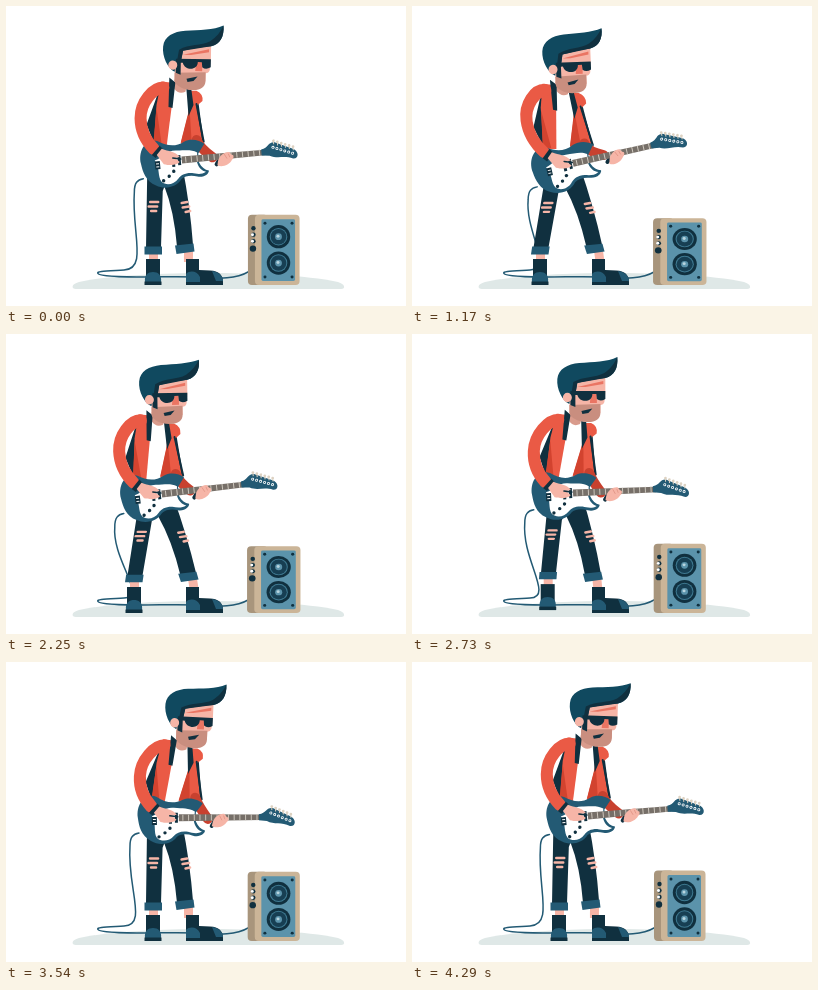
These frames come from a looping animation (400 by 300 pixels, 4.32 s). An HTML page:

```html
<!DOCTYPE html>
<html lang="en">
<head>
<meta charset="utf-8">
<title>Guitarist</title>
<style>
html, body { margin: 0; width: 100%; height: 100%; overflow: hidden; background: #fff; }
svg { display: block; width: 100vw; height: 100vh; }
.navy { fill: #10303f; }
.teal { fill: #10495f; }
.blue { fill: #235a74; }
.red { fill: #ea5a45; }
.shade { fill: #d2432f; }
.skin { fill: #f6b5a7; }
.white { fill: #fff; }
.line { fill: none; stroke-linecap: round; stroke-linejoin: round; }
</style>
</head>
<body>
<svg viewBox="0 0 400 300">
  <path fill="#dfe8e7" d="M70 283H335C340 283 339 278 332 276C300 269 245 267 202 267S105 269 73 276C65 278 65 283 70 283Z"/>
  <path id="cable" class="line" stroke="#235a74" stroke-width="1.5"/>

  <g id="amp">
    <rect x="242" y="208.500" width="20" height="70.500" rx="4" fill="#a8957c"/>
    <rect x="249" y="208.500" width="44.500" height="70.500" rx="4" fill="#cbb598"/>
    <rect x="255.500" y="213" width="33.500" height="62" rx="1.500" fill="#5b93ab"/>
    <g id="speakers"></g>
    <g class="navy">
      <circle cx="247.500" cy="222" r="2.200"/><circle cx="247.500" cy="228.500" r="2.200"/>
      <circle cx="247.500" cy="235" r="2.200"/><circle cx="247" cy="242.500" r="3.200"/>
    </g>
    <g class="white">
      <circle cx="246.500" cy="228.500" r="1.500"/><circle cx="246.500" cy="235" r="1.500"/>
    </g>
  </g>

  <g id="bootL">
    <path class="skin" d="M143 246H152V255H143Z"/>
    <path class="navy" d="M140 253H154V270H140Z"/>
    <path class="blue" d="M139 276C138 269 142 266 147 266S156 269 155 276Z"/>
    <path class="navy" d="M138.500 275.500H155.500V279H138.500Z"/>
  </g>

  <g id="legR">
    <path class="skin" d="M178 244H187V256H178Z"/>
    <path class="navy" d="M150 160H176Q184 200 187 239L171 241Q168 205 158 180Z"/>
    <path class="blue" d="M169 239.500L187.500 237.500L188.500 245.500L170.500 248Z"/>
    <path class="line" stroke="#f6b5a7" stroke-width="2.500" d="M175.500 197L181 196M176.500 201.500L183 200.500M179.500 206L184 205"/>
  </g>
  <path class="navy" d="M180 253H193V264L204 264.500C213 265 217 269 217 276V279H180Z"/>
  <path class="blue" d="M180 276V268C184 264 191 265 194 271V276ZM206 265C213 266 217 270 217 275H210Z"/>
  <g id="legL">
    <path class="navy" d="M141 160H166L156.500 185L155 241H140Z"/>
    <path class="blue" d="M138.500 240.500H156V248.500H138.500Z"/>
    <path class="line" stroke="#f6b5a7" stroke-width="2.500" d="M144 196H152M142.500 200.500H151M145 205H150"/>
  </g>

  <g id="torso">
    <path class="navy" d="M151 90L140 119L147 137H154V90ZM186 86L191 90L197 136H189Z"/>
    <path class="white" d="M165 82H181L184 140H154Z"/>
    <path fill="#d99b8c" d="M168 75H182L179 87Q172 90 168 84Z"/>
    <path class="red" d="M155 77L164 78L165 103L160 140H147L150 100Z"/>
    <path class="shade" d="M150 103L155 139H146.500Z"/>
    <path class="red" d="M182 86L190 86Q197 89 196 96L190 101L196 138H174L182 108Z"/>
    <path class="shade" d="M183 103L185 137H174Z"/>
    <path class="navy" d="M163 73L169 78L166 103L162 102ZM180 84L185 85L187 100L182 111Z"/>
    <path class="line" stroke="#10303f" stroke-width="2" d="M190 99L197 136"/>
  </g>

  <g id="head">
    <path class="skin" d="M168 40H204V55L203 65Q202 68 199 68V76L190 82L168 75Z"/>
    <path fill="#c98e7f" d="M168 68L199 67V76C199 82 194 85 187 85C178 85.500 169 81 168 76Z"/>
    <path fill="#ea7563" d="M189.500 56H195.500V66H188.500ZM176 50L202 44V47L184 50Z"/>
    <path class="navy" d="M180 74L191 71.500L187 76L181 77Z"/>
    <path id="hair" class="teal"/>
    <path id="hairShade" class="navy"/>
    <path class="navy" d="M169 54H204V62Q199 65 195.500 62L195 57H191C191 66 178 66 176 58H174V70L169 68Z"/>
    <ellipse class="skin" cx="166" cy="60.500" rx="4.500" ry="4.700"/>
  </g>

  <path id="sleeve" class="line" stroke="#c8412f" stroke-width="10"/>
  <path id="cuffR" class="line" stroke="#10303f" stroke-width="4"/>

  <g id="guitar">
    <path class="blue" d="M-41 0C-43 -14 -33 -26 -22 -21C-14 -16 -6 -13 4 -18C11 -21 20 -18 24 -14L17 -5L17 4C19 9 22 12 26 13C26 16 21 20 14 18C8 16 2 16 -2 19C-8 27 -20 28 -28 23C-38 18 -40 8 -41 0Z"/>
    <path class="white" d="M-27 -2C-18 -4 -15 -11 -5 -10C4 -9 10 -10 16 -6L15 4C16 9 19 13 23 14C18 17 13 15 9 14C2 13 -2 15 -5 18C-10 24 -18 24 -22 20C-26 14 -22 6 -27 -2Z"/>
    <g class="navy">
      <circle cx="-20" cy="19" r="1.700"/><circle cx="-14" cy="15" r="1.700"/><circle cx="-9" cy="10.500" r="1.700"/>
      <path d="M-27 -1H-22V7H-27ZM-10 -5H-7V6H-10ZM-4 -5H-1V5H-4Z"/>
    </g>
    <path class="white" d="M-26 1H-23V2H-26ZM-26 4H-23V5H-26Z"/>
    <path fill="#766f68" d="M0 -3.500L83 -2.500V3L0 3.500Z"/>
    <g id="frets"></g>
    <path class="blue" d="M80 -3C88 -4 87 -10 94 -9L111 -1C118 2 117 10 111 9C103 5 95 8 88 4L80 3Z"/>
    <g id="tuners"></g>
  </g>

  <g id="armL">
    <path class="line" stroke="#ea5a45" stroke-width="12" d="M157 83C147 83 134 97 134 113C134 127 141 137 147 143"/>
    <path class="navy" d="M145 149L153 140L156 143L149 152Z"/>
    <path class="skin" d="M150 149L155 143C162 146 168 145 173 151L168 152L173 156C169 160 162 159 157 158Z"/>
    <path class="line" stroke="#10303f" stroke-width="1.500" d="M166 152L174 153"/>
  </g>
  <g id="handR">
    <path class="skin" d="M-8 4C-6 -2 0 -5 4 -4L6 -1C9 -1 8 3 6 4C3 9 -5 11 -9 8Z"/>
    <path class="line" stroke="#df9384" stroke-width=".8" d="M-1 -2L1 2M3 -2L4 1"/>
  </g>
</svg>
<script>
const LOOP = 4320, BEAT = 270, TAU = Math.PI * 2;
const $ = id => document.getElementById(id);
const set = (id, name, value) => $(id).setAttribute(name, value);
const repeat = (n, draw) => Array.from({ length: n }, (_, i) => draw(i)).join("");
const disc = (x, y, r, fill) => `<circle cx="${x}" cy="${y}" r="${r}" fill="${fill}"/>`;

$("speakers").innerHTML =
  [230.5, 257].map(y => disc(272.5, y, 11.7, "#10303f") + disc(272.5, y, 8.8, "#3f7a92") +
    disc(272.5, y, 7.8, "#173f53") + disc(272.5, y, 3.4, "#5b93ab") + disc(272, y - .5, 1.5, "#b9d5df")).join("") +
  repeat(4, i => disc(i % 2 ? 286 : 259, i < 2 ? 217 : 271, 1.5, "#10303f"));
$("frets").innerHTML = repeat(14, i =>
  `<path stroke="#d2ccc2" stroke-width=".9" d="M${4 + i * 5.7} -3V3"/>`);
$("tuners").innerHTML = repeat(6, i => {
  const x = 92 + i * 3.8, y = -4 + i * 1.55;
  return disc(x + 1, y - 6.5, 1.4, "#ddd2c2") +
    `<path stroke="#ddd2c2" d="M${x + 1} ${y - 6}V${y - 3}"/>` + disc(x, y, 1.5, "#fff") + disc(x, y, .7, "#235a74");
});

const wave = (t, mid, size, deg) => mid + size * Math.cos(TAU * t / LOOP + deg * Math.PI / 180);
// A wave that lingers at both ends
const sway = (t, mid, size, deg) => wave(t, mid, size, deg) - wave(3 * t, 0, .12 * size, 3 * deg);
const pulse = (t, start) => (1 - Math.cos(TAU * (t - start) / BEAT)) / 2;
const ramp = (t, a, b) => {
  const u = Math.min(1, Math.max(0, (t - a) / (b - a)));
  return u * u * (3 - 2 * u);
};

// Shear that shifts height y0 by p and height y1 by q
function shear(y0, p, y1, q) {
  const kx = (q.x - p.x) / (y1 - y0), ky = (q.y - p.y) / (y1 - y0);
  return `matrix(1 0 ${kx} ${1 + ky} ${p.x - kx * y0} ${p.y - ky * y0})`;
}

function draw(t) {
  const bob = pulse(t, 15), thump = pulse(t, 250);
  const chest = { x: sway(t, -11.5, 15, 45), y: wave(t, 1, 2.4, 170) };
  const waist = { x: wave(t, -9.5, 10.8, 18), y: wave(t, 3, 3, 180) };
  const hip = { x: wave(t, -4, 5, 30), y: waist.y * .5 };
  const out = ramp(t, 150, 450), back = ramp(t, 2600, 2900);
  const step = out - back;
  const foot = { x: -19 * step, y: -12 * (out * (1 - out) + back * (1 - back)) };
  const ankle = { x: 4 * step, y: 0 };

  set("amp", "transform", `translate(267.5 279) scale(${1 + .04 * thump} ${1 - .056 * thump}) translate(-267.5 -279)`);
  set("bootL", "transform", `translate(${foot.x} ${foot.y})`);
  set("legL", "transform", shear(165, hip, 245, foot));
  set("legR", "transform", shear(165, hip, 245, ankle));
  const body = shear(80, chest, 150, waist);
  set("torso", "transform", body);
  set("armL", "transform", body);

  const tilt = wave(t, -1, 3.5, 55) + 3 * bob;
  set("head", "transform", `translate(${chest.x} ${chest.y + 3 * bob}) rotate(${tilt} 172 82)`);
  const tx = 216, ty = 20 + 2 * bob;
  set("hair", "d", `M168 67C161 64 155 52 156 42C157 32 166 27 178 26C192 25 206 25 ${tx} ${ty}C217 31 213 39 204 41C193 42 184 44 176 46L174 57L169 59Z`);
  set("hairShade", "d", `M${tx} ${ty}C217 31 213 39 204 41L176 46L174 57H170L172 45C182 39 194 41 203 36C209 32 213 27 ${tx} ${ty}Z`);

  const angle = wave(t, -6.5, 6.3, 80);
  const a = angle * Math.PI / 180, gx = 175 + waist.x, gy = 154 + waist.y;
  const onGuitar = (x, y) => [gx + x * Math.cos(a) - y * Math.sin(a), gy + x * Math.sin(a) + y * Math.cos(a)];
  set("guitar", "transform", `translate(${gx} ${gy}) rotate(${angle})`);

  const [hx, hy] = onGuitar(wave(t, 43, 2, -60), .5);
  set("handR", "transform", `translate(${hx} ${hy}) rotate(${angle})`);
  const ex = 190 + chest.x * .35 + waist.x * .65, ey = 134 + waist.y;
  set("sleeve", "d", `M${ex} ${ey}Q${ex + 3} ${ey + 8} ${hx - 13} ${hy + 1}`);
  set("cuffR", "d", `M${hx - 6} ${hy + 3}L${hx - 9} ${hy + 8}`);

  const [jx, jy] = onGuitar(-40, 15);
  set("cable", "d", `M${jx} ${jy}C${jx - 6} ${jy + 1} ${jx - 9} ${jy + 4} ${jx - 9} ${jy + 13}C${jx - 12} 226 142 263 118 264C100 265 90 265 92 267.500C95 273 160 270 190 271C215 273 230 273 243 265.500`);
}

const start = performance.now();
function tick() {
  draw((performance.now() - start) % LOOP);
  requestAnimationFrame(tick);
}
tick();
</script>
</body>
</html>
```
